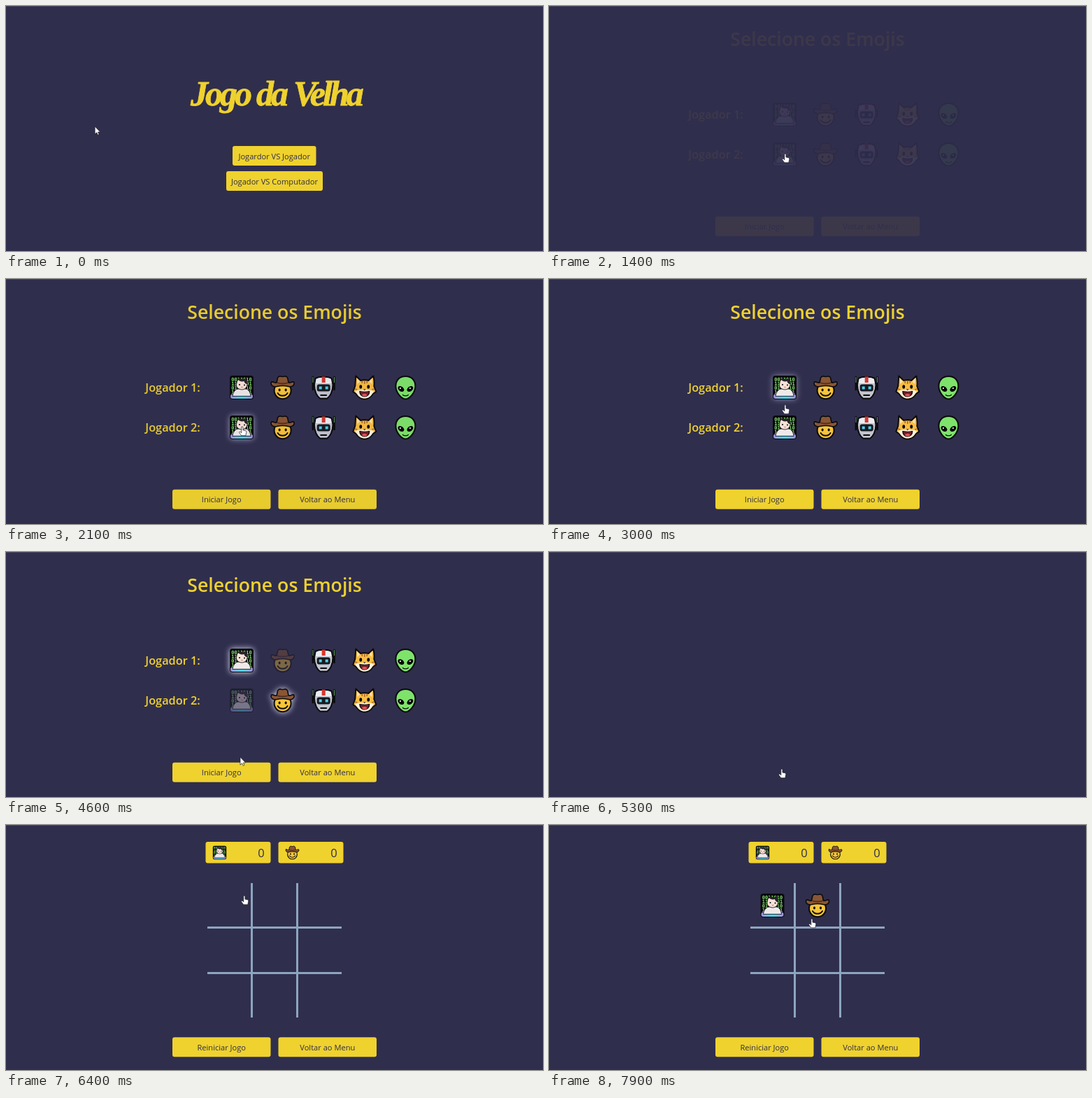
An HTML page that plays this animation: 768x350 px, repeating every 8 s.

```html
<!DOCTYPE html>
<html lang="pt">
<head>
<meta charset="utf-8">
<title>Jogo da Velha</title>
<style>
  html, body { margin: 0; width: 100%; height: 100%; overflow: hidden; background: #302e4d; }
  svg { display: block; width: 100vw; height: 100vh; }
  text { font-family: "Open Sans", "Noto Sans", sans-serif; font-weight: 600; }
  .yellow { fill: #efd22e; }
  .label { font-size: 11.1px; font-weight: 500; fill: #302e4d; text-anchor: middle; }
  .score { font-size: 16.5px; font-weight: 400; fill: #302e4d; text-anchor: middle; }
  .brush { font: italic 700 50px "Liberation Serif", "Noto Serif", serif; letter-spacing: -4px;
           stroke: #efd22e; stroke-width: .8; }
  .bits { font: 700 7px "DejaVu Sans Mono", monospace; fill: #86dd72; text-anchor: middle; }
  .ink { stroke: #0b0b0d; stroke-width: 2; stroke-linejoin: round; stroke-linecap: round; }
  .thin { stroke-width: 1.2; }
  .none { fill: none; }
</style>
</head>
<body>
<svg viewBox="0 0 768 350" xmlns="http://www.w3.org/2000/svg">
  <defs>
    <linearGradient id="desk">
      <stop offset="0" stop-color="#a890e0"/><stop offset=".5" stop-color="#45d8ea"/><stop offset="1" stop-color="#a890e0"/>
    </linearGradient>

    <g id="coder">
      <rect x="-17" y="-17" width="34" height="34" rx="4" fill="#08090c"/>
      <text class="bits"><tspan x="0" y="-9">0011010</tspan><tspan x="0" y="-3">1101101</tspan><tspan x="0" y="3">0110010</tspan><tspan x="0" y="9">1010011</tspan></text>
      <rect x="-16" y="9.5" width="32" height="6.5" rx="3.2" fill="url(#desk)"/>
      <path d="M-13 12C-12 5-8 2-4 2H5C9 2 12 5 13 12Z" fill="#efe9ea" class="ink" style="stroke-width:.8"/>
      <path d="M-6.5-9L-4-13L-1-11.5H3L7-14L8-6C8.5 0 4 3 .5 3C-4 3-8 0-7.5-4Z" fill="#f9e2d8" class="ink" style="stroke-width:.8"/>
      <path d="M-4-13L-1-11.5H3L7-14L8-5C5-5 4-7 3.5-9C0-8-3-9-5-11Z" fill="#282329"/>
      <circle cx="-3" cy="-4" r="1"/><circle cx="4" cy="-3.5" r="1"/>
      <path d="M-1-1L.5 0L2-1" class="none" stroke="#a65c5c" stroke-width=".8"/>
    </g>

    <g id="cowboy">
      <circle cy="4.3" r="12" fill="#f8c43a" class="ink"/>
      <path d="M-16-8C-13-9-12-6-8.5-7L-7-14C-5-18-2-15.5 0-15.5S5-18 7-14L8.5-7C12-6 13-9 16-8C18-3 13 0 8-1.5C3-2.8-3-2.8-8-1.5C-13 0-18-3-16-8Z" fill="#8a5635" class="ink" style="stroke-width:1.6"/>
      <path d="M-8-7C-4-5 4-5 8-7" class="none" stroke="#55321f" stroke-width="1.8"/>
      <ellipse cx="-4.5" cy="3.5" rx="1.5" ry="2"/><ellipse cx="4.5" cy="3.5" rx="1.5" ry="2"/>
      <path d="M-7 8C-4 13 4 13 7 8" class="none ink"/>
    </g>

    <g id="robot">
      <path d="M-15.3-15V3M15.3-15V3" class="ink" style="stroke-width:2.6"/>
      <path d="M-15.3-15V-7M15.3-15V-7" stroke="#62a867" stroke-width=".9"/>
      <path d="M-11.5-13C-6-16 6-16 11.5-13L13.3-4C13.3 6 9 13 5 15.8H-5C-9 13-13.3 6-13.3-4Z" fill="#c3c6cf" class="ink"/>
      <path d="M-10.5-12C-6-15 6-15 10.5-12L11.5-6H-11.5Z" fill="#eceef2"/>
      <rect x="-2.5" y="-15.5" width="5" height="8.5" fill="#d8382f"/>
      <rect x="-9.5" y="-4.5" width="19" height="10" rx="3" fill="#17191f"/>
      <rect x="-6.5" y="-1.5" width="4" height="4" fill="#50cfec"/><rect x="2.5" y="-1.5" width="4" height="4" fill="#50cfec"/>
      <path d="M-4 11H4" class="ink"/>
    </g>

    <g id="cat">
      <path d="M-12.5-16.5L-5.5-10C-2-11 2-11 5.5-10L12.5-16.5C14-10 14-5 13.5-2L16.5 6L12 9C9 14 5 16.5 0 16.5S-9 14-12 9L-16.5 6L-13.5-2Z" fill="#f7bd45" class="ink"/>
      <path d="M-11-13L-6.5-8.5L-10.5-5ZM11-13L6.5-8.5L10.5-5Z" fill="#fbe0b0"/>
      <path d="M0-10V-5M-3.5-9.5V-6M3.5-9.5V-6M-14 2L-10.5 3M14 2L10.5 3" stroke="#a9692a" stroke-width="1.5"/>
      <path d="M-13.5 6C-9 2-3 5 0 2C3 5 9 2 13.5 6L11 9C8 14 4 15.5 0 15.5S-8 14-11 9Z" fill="#fff3dc"/>
      <ellipse cx="-5.5" cy="-1" rx="1.9" ry="2.8"/><ellipse cx="5.5" cy="-1" rx="1.9" ry="2.8"/>
      <path d="M-7 5.5Q0 7 7 5.5C7 15.5-7 15.5-7 5.5Z" fill="#7c2028" class="ink thin"/>
      <path d="M-4 11C-2 8.8 2 8.8 4 11C2 13-2 13-4 11Z" fill="#ee5960"/>
      <path d="M-2 2.3H2L0 4.5Z" fill="#57382d"/>
    </g>

    <g id="alien">
      <path d="M0-16C9-16 14-10 14-2C14 7 6 16.5 0 16.5S-14 7-14-2C-14-10-9-16 0-16Z" fill="#7ee36b" class="ink"/>
      <ellipse rx="5" ry="3.4" transform="translate(-6.5 2) rotate(38)"/>
      <ellipse rx="5" ry="3.4" transform="translate(6.5 2) rotate(-38)"/>
      <circle cx="-7.5" cy="1" r="1.1" fill="#fff"/><circle cx="6.5" cy="1" r="1.1" fill="#fff"/>
      <path d="M-4 10.5C-2 12.3 2 12.3 4 10.5" class="none ink thin"/>
    </g>
  </defs>

  <rect width="768" height="350" fill="#302e4d"/>
  <rect width="768" height="1" fill="#48475c"/>
  <g id="menu"></g>
  <g id="pick"></g>
  <g id="game"></g>
  <path id="arrow" d="M-1-1V10L1.6 7.7L3.2 11.2L5 10.4L3.4 7H6.6Z" fill="#fff" stroke="#1c1b28" stroke-width=".7"/>
  <path id="hand" d="M-1.2 1C-1.2-.4 1-.4 1 1V5L4.5 5.7Q6 6 5.8 7.7L4.8 12.8H-1.2L-4.3 8.6C-4.8 7.4-3.4 6.6-2.4 7.6L-1.2 8.8Z" fill="#fff" stroke="#1c1b28" stroke-width=".7"/>
</svg>

<script>
const $ = id => document.getElementById(id);
const faces = ["coder", "cowboy", "robot", "cat", "alien"];
const rows = [155, 212];

const button = (id, x, y, w, label) => `<g id="${id}">
  <rect class="yellow" x="${x}" y="${y}" width="${w}" height="28" rx="3"/>
  <text class="label" x="${x + w / 2}" y="${y + 18.6}">${label}</text></g>`;
const face = (name, x, y, id = "", scale = 1) =>
  `<g id="${id}"><use href="#${name}" transform="translate(${x} ${y}) scale(${scale})"/></g>`;
const score = (x, name) => `<rect class="yellow" x="${x}" y="24" width="93" height="30.5" rx="3"/>
  ${face(name, x + 20, 39.5, name + "Score", .57)}<text class="score" x="${x + 79.5}" y="46">0</text>`;

$("menu").innerHTML = `<text class="yellow brush" y="142"><tspan x="264">Jogo</tspan><tspan x="358">da</tspan><tspan x="411">Velha</tspan></text>`
  + button("versus", 324, 200, 119.5, "Jogardor VS Jogador")
  + button("solo", 315, 236, 138, "Jogador VS Computador");

$("pick").innerHTML = `<text class="yellow" x="384" y="56.5" font-size="26.65" text-anchor="middle">Selecione os Emojis</text>`
  + rows.map((y, r) => `<text class="yellow" x="238.5" y="${y + 6}" font-size="16.3" text-anchor="middle">Jogador ${r + 1}:</text>`
    + faces.map((name, i) => face(name, 337 + 58.6 * i, y, `p${r}${i}`)).join("")).join("")
  + button("start", 238, 300.7, 140.5, "Iniciar Jogo")
  + button("back", 389.5, 300.7, 140.5, "Voltar ao Menu");

$("game").innerHTML = score(285.5, "coder") + score(389.5, "cowboy")
  + `<path id="grid" d="M351.5 83V275M416.5 83V275M288 146.5H480M288 211.5H480" stroke="#8ca5c0" stroke-width="3"/>`
  + face("coder", 319.5, 115, "mark0") + face("cowboy", 384, 115, "mark1")
  + button("restart", 238, 303.2, 140.5, "Reiniciar Jogo")
  + button("leave", 389.5, 303.2, 140.5, "Voltar ao Menu");

// time, x, y of the pointer tip
const path = [
  [0, 127, 173], [100, 240, 178], [200, 380, 186], [300, 273, 201], [550, 273, 201],
  [700, 338, 216], [850, 345, 222], [1200, 338, 211], [2300, 338, 211], [3000, 338, 180],
  [3200, 338, 160], [3800, 338, 160], [4050, 396, 210], [4300, 396, 212], [4600, 336, 294],
  [4800, 333, 310], [5850, 333, 310], [6400, 341, 101], [6700, 330, 112], [7050, 330, 114],
  [7400, 370, 124], [7700, 376, 134], [8000, 376, 134]
];

const ramp = (t, from, to) => Math.min(1, Math.max(0, (t - from) / (to - from)));

// the CSS "ease" curve
function ease(x) {
  let lo = 0, hi = 1;
  for (let i = 0; i < 20; i++) {
    const s = (lo + hi) / 2;
    if (.75 * s * (1 - s) + s ** 3 < x) lo = s; else hi = s;
  }
  return .3 * lo * (1 - lo) ** 2 + 3 * lo * lo * (1 - lo) + lo ** 3;
}

const fade = (t, from, span) => ease(ramp(t, from, from + span));
const during = (t, from, to) => fade(t, from, 300) * (1 - fade(t, to, 300));

function glow(id, amount, size = 4) {
  $(id).style.filter = amount > .01 ? `drop-shadow(0 0 ${size}px rgba(225,230,255,${amount}))` : "none";
}

function pointer(t) {
  const i = path.findIndex(k => k[0] > t);
  const [t0, x0, y0] = path[i - 1], [t1, x1, y1] = path[i];
  const k = ramp(t, t0, t1);
  const hand = t >= 650 && t < 4350 || t >= 4700;
  $("hand").style.display = hand ? "" : "none";
  $("arrow").style.display = hand ? "none" : "";
  $(hand ? "hand" : "arrow").setAttribute("transform", `translate(${x0 + (x1 - x0) * k} ${y0 + (y1 - y0) * k})`);
}

const pickAt = 1320, gameAt = 5300;

function draw(t) {
  const show = (id, on) => $(id).style.display = on ? "" : "none";
  show("menu", t < pickAt);
  show("pick", t >= pickAt && t < gameAt);
  show("game", t >= gameAt);

  $("pick").style.opacity = fade(t, pickAt, 1000);
  $("game").style.opacity = $("grid").style.opacity = fade(t, gameAt, 1000);

  glow("versus", .55 * fade(t, 650, 400), 2);
  glow("p10", .6 * during(t, pickAt, 2400));
  glow("p00", .5 * fade(t, 2750, 300) + .45 * fade(t, 3300, 300));
  glow("p11", .5 * fade(t, 3950, 200) + .45 * fade(t, 4150, 250));
  glow("start", .55 * fade(t, 4750, 300), 2);
  glow("restart", .55 * during(t, gameAt, 5900), 2);

  $("p10").style.opacity = 1 - .62 * fade(t, 3300, 400);
  $("p01").style.opacity = 1 - .62 * fade(t, 4150, 400);
  $("mark0").style.opacity = fade(t, 6750, 300);
  $("mark1").style.opacity = fade(t, 7620, 250);
  pointer(t);
}

function loop(now) {
  draw(now % 8000);
  requestAnimationFrame(loop);
}
draw(0);
requestAnimationFrame(loop);
</script>
</body>
</html>
```
